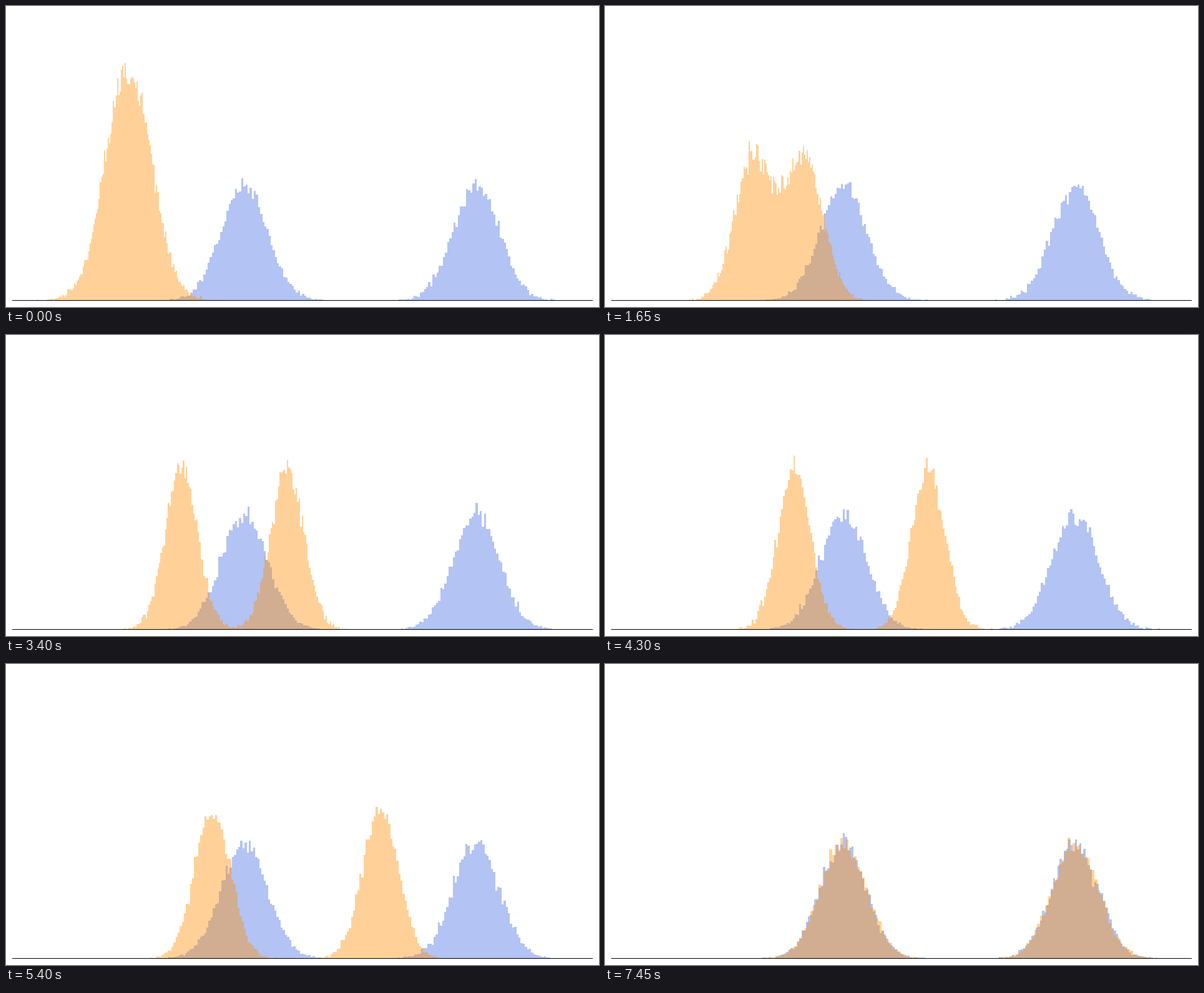
A matplotlib script that plays this animation: 950x482 px, repeating every 7500 ms.

```python
import numpy as np
import matplotlib.pyplot as plt
from matplotlib.animation import FuncAnimation

W, H, DPI = 950, 482, 100
FRAMES, INTERVAL = 150, 50
N = 30000
START, MODES = 5, (10, 20)

fig = plt.figure(figsize=(W / DPI, H / DPI), dpi=DPI, facecolor="white")
ax = fig.add_axes([10.4 / W, 10.6 / H, 929 / W, 461 / H])
ax.set(xlim=(0, 25), ylim=(0, 0.5), xticks=[], yticks=[])
ax.spines[["left", "right", "top"]].set_visible(False)
ax.spines["bottom"].set_linewidth(72 / DPI)  # one pixel


def add_hist(bins, color):
    return ax.stairs(np.zeros(bins), np.linspace(0, 25, bins + 1),
                     fill=True, color=color, alpha=0.4, lw=0)


target = add_hist(200, "royalblue")
moving = add_hist(150, "darkorange")


def sample_mixture(rng):
    return rng.choice(MODES, N) + rng.standard_normal(N)


def show_hist(patch, x, bins):
    density, edges = np.histogram(x, bins, density=True)
    patch.set_data(density, edges)


def update(k):
    # Fresh samples each frame; the moving cloud blends two independent draws.
    rng = np.random.default_rng(k)
    t = k / (FRAMES - 1)
    x0 = START + rng.standard_normal(N)
    x1 = sample_mixture(rng)
    show_hist(target, sample_mixture(rng), 200)
    show_hist(moving, (1 - t) * x0 + t * x1, 150)
    return target, moving


anim = FuncAnimation(fig, update, frames=FRAMES, interval=INTERVAL,
                     init_func=lambda: update(0), repeat=True, repeat_delay=0)
plt.show()
```
